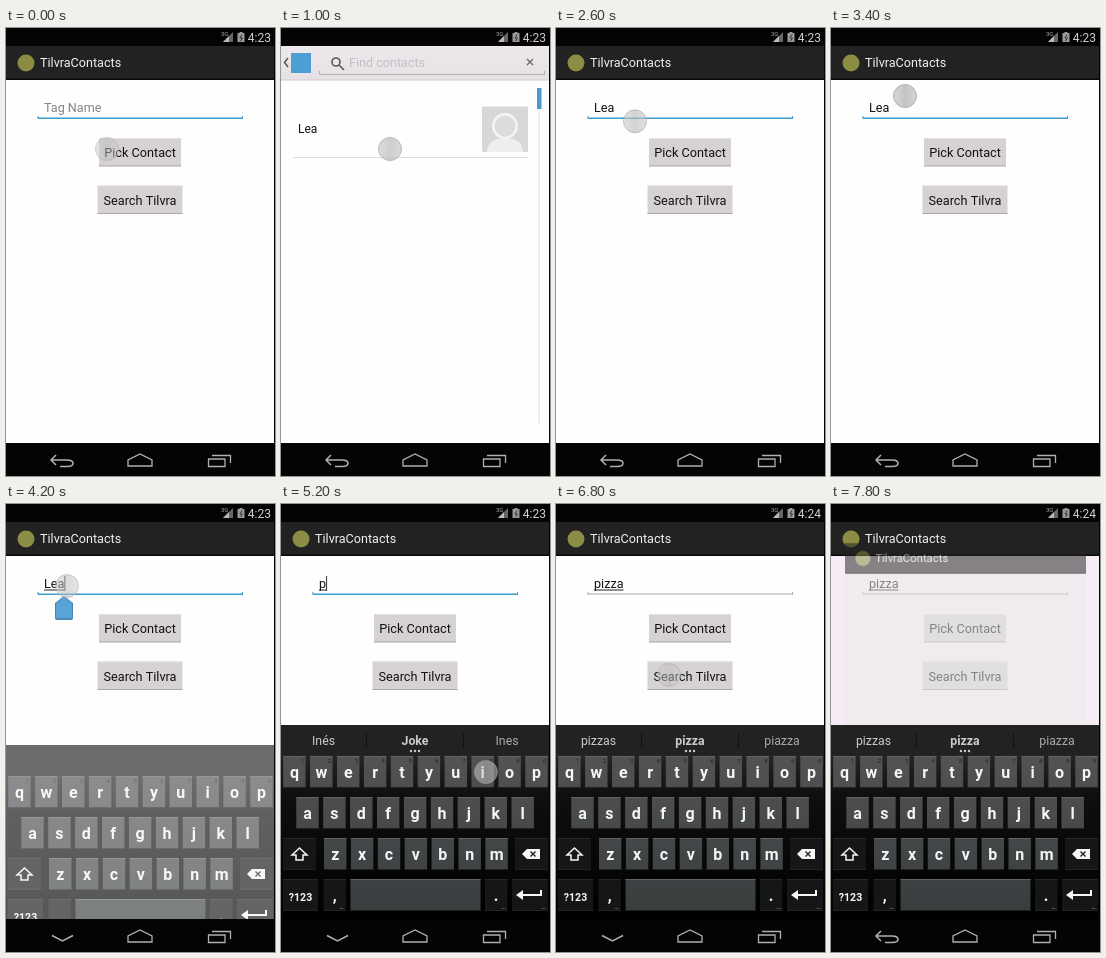
An HTML page with a canvas that plays this animation: 269 px wide and 448 px high, repeating every 8000 ms.

```html
<!DOCTYPE html>
<html lang="en">
<head>
<meta charset="utf-8">
<title>Contact picker demo</title>
<style>
html, body { margin: 0; width: 100%; height: 100%; overflow: hidden; background: #000; }
canvas { display: block; width: 269px; height: 448px; }
</style>
</head>
<body>
<canvas id="stage"></canvas>
<script>
const W = 269, H = 448, LOOP = 8000, STEP = 200;
const APP = 'TilvraContacts', CONTACT = 'Lea';
const ratio = window.devicePixelRatio || 1;

function prepare(canvas) {
  canvas.width = W * ratio;
  canvas.height = H * ratio;
  return canvas.getContext('2d');
}
const stage = prepare(document.getElementById('stage'));
const layer = prepare(document.createElement('canvas'));
let c = stage;

// Pointer path: time, x, y, opacity
const pointerPath = [
  [0, 101, 121, .5], [600, 109, 121, .52], [1400, 109, 121, .9], [2000, 82, 102, .52],
  [2400, 80, 100, .52], [3000, 77, 80, .85], [3400, 74, 68, .85], [3800, 61, 82, .52],
  [4200, 61, 82, .52], [4600, 240, 340, .52], [4800, 249, 350, .52], [5000, 255, 268, .52],
  [5200, 205, 268, .52], [5600, 54, 350, .52], [6000, 54, 350, .52], [6200, 26, 309, .52],
  [6400, 26, 309, .52], [6800, 113, 171, .5], [7400, 113, 171, .5]
];

const typed = [
  [0, ''], [2400, CONTACT], [4800, ''], [5000, 'p'], [5400, 'pi'],
  [5800, 'piz'], [6000, 'pizz'], [6400, 'pizza']
];
const hints = [
  [4400, ['Inés', 'Joke', 'Ines']],
  [5400, ['pic', 'pi', 'pin']],
  [5800, ['pizzas', 'pizza', 'piazza']]
];
const latest = (list, t) => list.filter(item => item[0] <= t).pop()[1];

function rect(x, y, w, h, color) {
  c.fillStyle = color;
  c.fillRect(x, y, w, h);
}

function disc(x, y, r, color) {
  c.fillStyle = color;
  c.beginPath();
  c.arc(x, y, r, 0, 7);
  c.fill();
}

function text(s, x, y, size, color, align = 'left', weight = 400) {
  c.font = `${weight} ${size}px Roboto, sans-serif`;
  c.textAlign = align;
  c.fillStyle = color;
  c.fillText(s, x, y);
}

function stroke(path, color, width = 1.3) {
  c.strokeStyle = color;
  c.lineWidth = width;
  c.stroke(new Path2D(path));
}

function shape(path, color) {
  c.fillStyle = color;
  c.fill(new Path2D(path));
}

function vertical(y1, y2, from, to) {
  const g = c.createLinearGradient(0, y1, 0, y2);
  g.addColorStop(0, from);
  g.addColorStop(1, to);
  return g;
}

// Draws a whole screen as one translucent group, scaled about the stage centre
function group(drawScreen, alpha, scale = 1, dy = 0) {
  c = layer;
  c.setTransform(ratio, 0, 0, ratio, 0, 0);
  c.clearRect(0, 0, W, H);
  drawScreen();
  c = stage;
  c.globalAlpha = alpha;
  c.drawImage(layer.canvas, W * (1 - scale) / 2, H * (1 - scale) / 2 + dy, W * scale, H * scale);
  c.globalAlpha = 1;
}

function statusBar(t) {
  rect(0, 0, W, 18, '#050303');
  text('3G', 215, 8, 6, '#aaa');
  shape('M227 4V14H217Z', '#666');
  shape('M223 8V14H217Z', '#bbb');
  shape('M233.5 4H236.5V5H238.5V14H231.5V5H233.5Z', '#999');
  stroke('M236 6.5L234 10H236.5L234.5 13', '#333', 1);
  text(t < 6000 ? '4:23' : '4:24', 265, 13.5, 12, '#d0d0d0', 'right');
}

function navBar(t) {
  const gray = '#b0b0b0';
  rect(0, 415, W, 33, '#050303');
  stroke(t >= 4200 && t < 7800
    ? 'M46 431.5L56.5 437L67 431.5'
    : 'M50 427L45 432L50 437M45 432H61C69 432 69 438.5 61 438.5H54', gray, 1.5);
  stroke('M122 438V432L134 426L146 432V438Z', gray);
  stroke('M202.5 431H219V438.5H202.5ZM206 427.5H224.5V435', gray);
}

function actionBar() {
  rect(0, 18, W, 34, '#222');
  rect(0, 50.5, W, 1.5, '#0a0808');
  disc(20, 35, 8.5, '#8b8d45');
  text(APP, 34, 39, 12.6, '#f0f0f0');
}

function button(label, x, y, w) {
  rect(x, y, w, 28, '#d5d1d4');
  rect(x, y, w, 1, '#e3e0e2');
  rect(x, y + 27.5, w, 1, '#a9a5a8');
  text(label, x + w / 2, y + 19, 12.7, '#111', 'center');
}

function formScreen(t) {
  rect(0, 18, W, 397, t >= 7600 ? '#f5ecf5' : '#fefefe');
  actionBar();
  const value = latest(typed, t);
  const editing = t >= 3800;
  text(value || (editing ? '' : 'Tag Name'), 38, 84, 12.6, value ? '#111' : '#858585');
  const end = 38 + (value ? c.measureText(value).width : 0);
  if (editing) {
    rect(38, 85.5, end - 38, 1, '#222');
    if (t < 6600) rect(end, 72, 1, 15, '#333');
  }
  const blurred = t >= 6600;
  const line = blurred ? '#aaa' : '#3b9ccc';
  rect(32, 89.5, 205, blurred ? 1 : 1.5, line);
  rect(31.5, 88, 1, 3, line);
  rect(236, 88, 1, 3, line);
  button('Pick Contact', 93, 110, 82);
  button('Search ' + APP.slice(0, 6), 91.5, 157.5, 85);
  if (t >= 3800 && t < 4600) {
    shape('M58 92L67 99V114Q67 116 65 116H51Q49 116 49 114V99Z', '#4a87b4');
    shape('M58 93L66 99.5V114H50V99.5Z', '#58a4d9');
  }
}

function contactScreen() {
  rect(0, 18, W, 397, '#fefefe');
  rect(0, 18, W, 34, vertical(18, 52, '#ece8ec', '#e5e1e5'));
  rect(0, 51.5, W, 1, '#cfcbcf');
  stroke('M7 30L3.5 34.5L7 39', '#555', 1.5);
  rect(10, 25, 20, 20, '#4b9fd2');
  stroke('M38.5 43V46.5H263.5V43', '#b5b1b5', 1);
  stroke('M59 34A4 4 0 1 1 51 34A4 4 0 1 1 59 34M58 37L63 42', '#555', 1.6);
  text('Find contacts', 68, 39, 12.6, '#c3bfc3');
  stroke('M246 31L252 37M252 31L246 37', '#666', 1.2);

  text(CONTACT, 17, 105, 12, '#111');
  rect(201, 78.5, 46, 45.5, '#d9d6d9');
  shape('M206 124C206 114 214 110 224 110S242 114 242 124Z', '#efedef');
  disc(224, 98, 13, '#f5f3f5');
  disc(224, 98, 10.5, '#dedbde');
  rect(12, 129, 235, 1, '#dedede');
  rect(257.5, 60, 1, 335, '#dcdcdc');
  rect(256, 60, 4.5, 21, '#4a98cc');
}

function resultScreen() {
  rect(0, 18, W, 430, '#eaeaea');
  actionBar();
}

function key(x, y, w, label = '', dark = false, size = 16) {
  rect(x, y, w, 32, dark ? '#151617' : vertical(252, 407, '#535355', '#383d3e'));
  rect(x, y, w, 1, dark ? '#252627' : '#606264');
  rect(x, y + 31, w, 1, '#222');
  text(label, x + w / 2, y + 21.5, size, '#f6f6f6', 'center', 700);
}

function keyboard(t) {
  rect(0, 221, W, 194, vertical(250, 415, '#141414', '#000'));
  rect(0, 221, W, 30, '#222');
  rect(0, 251, W, 39, vertical(251, 290, '#252525', '#101010'));
  if (t >= 4400) {
    latest(hints, t).forEach((word, i) =>
      text(word, [42.5, 134, 226][i], 241, 12.3, i === 2 ? '#aaa' : '#ccc', 'center', i === 1 ? 700 : 400));
    for (const x of [85, 182]) rect(x, 229, 1, 15, '#111');
    for (const x of [130, 134, 138]) disc(x, 247, 1.2, '#ccc');
  }
  const rows = [['qwertyuiop', 2.2, 252], ['asdfghjkl', 15.3, 293], ['zxcvbnm', 43, 334]];
  for (const [letters, left, y] of rows) {
    [...letters].forEach((letter, i) => {
      const x = left + i * 26.9;
      key(x, y, 22.4, letter);
      if (y === 252) text((i + 1) % 10, x + 21, y + 7, 6, '#222', 'right');
    });
  }
  key(2, 334, 33, '', true);
  stroke('M18.5 344L26 351H22V356H15V351H11Z', '#f6f6f6', 1.5);
  key(234, 334, 33, '', true);
  shape('M241 350L246 345H259V355H246Z', '#f6f6f6');
  stroke('M249.5 347.5L254.5 352.5M254.5 347.5L249.5 352.5', '#222', 1.4);
  key(2, 375, 35, '?123', true, 10.5);
  key(42.5, 375, 22.4, ',', true);
  key(69.5, 375, 130);
  key(204, 375, 22.4, '.', true);
  key(231, 375, 36, '', true);
  stroke('M260 386V391H238', '#f6f6f6', 2);
  shape('M235 391L242 386V396Z', '#f6f6f6');
  for (const x of [63, 225, 265]) text('…', x, 405, 7, '#aaa', 'right');
}

function pointer(t) {
  if (t > 7400) return;
  const next = Math.max(1, pointerPath.findIndex(p => p[0] >= t));
  const a = pointerPath[next - 1], b = pointerPath[next];
  const k = (t - a[0]) / (b[0] - a[0]);
  const [x, y, opacity] = [1, 2, 3].map(i => a[i] + (b[i] - a[i]) * k);
  const shade = c.createLinearGradient(x - 12, y, x + 12, y);
  shade.addColorStop(0, '#d0d0d0');
  shade.addColorStop(.5, '#bababa');
  shade.addColorStop(1, '#cecece');
  c.globalAlpha = opacity;
  disc(x, y, 11.5, shade);
  c.strokeStyle = '#a8a8a8';
  c.lineWidth = 1;
  c.stroke();
  c.globalAlpha = 1;
}

function draw(t) {
  c.setTransform(ratio, 0, 0, ratio, 0, 0);
  if (t >= 1000 && t < 2400) contactScreen();
  else formScreen(t);
  if (t === 800 || t === 2400) group(contactScreen, .53, .897);
  if (t >= 7600) group(resultScreen, .53, .897);
  if (t === 4200) group(() => keyboard(t), .66, 1, 20);
  else if (t > 4200) keyboard(t);
  statusBar(t);
  navBar(t);
  pointer(t);
  rect(W - 1, 0, 1, H, '#050303');
}

let start, shown;
function tick(now) {
  start ??= now;
  const t = Math.floor((now - start) % LOOP / STEP) * STEP;
  if (t !== shown) draw(shown = t);
  requestAnimationFrame(tick);
}
draw(shown = 0);
requestAnimationFrame(tick);
</script>
</body>
</html>
```
